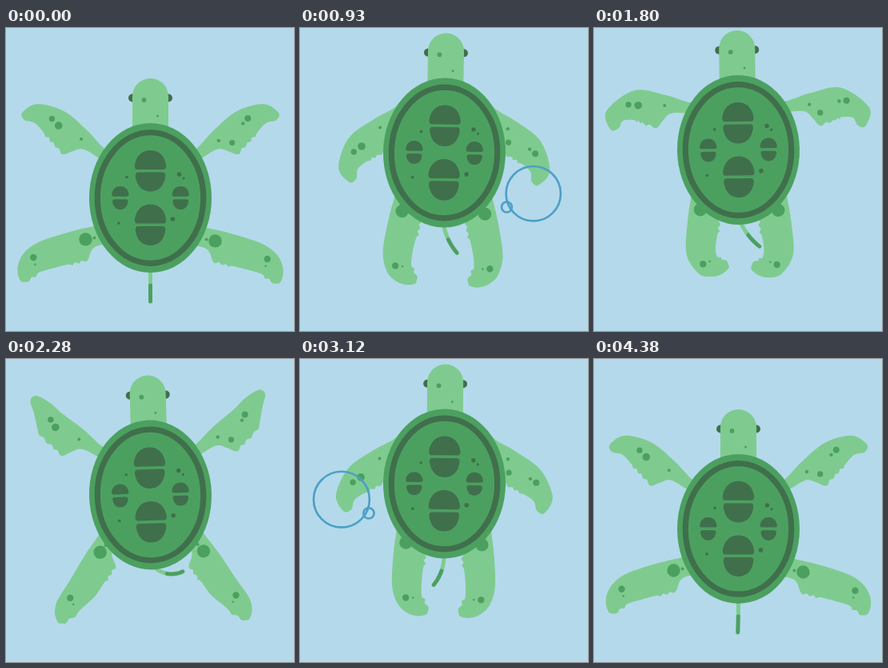
Animation, 360 px wide and 379 px high, one loop 4410 ms. Source, as an HTML page with a canvas:

```html
<!DOCTYPE html>
<html lang="en">
<head>
<meta charset="utf-8">
<title>Swimming turtle</title>
<style>
  html, body { margin: 0; width: 100%; height: 100%; overflow: hidden; background: #b4d9eb; }
  canvas { display: block; width: 360px; height: 379px; }
</style>
</head>
<body>
<canvas id="stage"></canvas>
<script>
const LOOP = 4410, STEP = 30, LIFE = 1090;
const WATER = '#b4d9eb', SKIN = '#7fcb8f', SHELL = '#4ca05f', DARK = '#406f4c', BUBBLE = '#4b9fc6';
const TAU = Math.PI * 2, RAD = Math.PI / 180;
const CX = 180.5, CY = 212.5;

const canvas = document.getElementById('stage');
const ctx = canvas.getContext('2d');
const ratio = window.devicePixelRatio || 1;
canvas.width = 360 * ratio;
canvas.height = 379 * ratio;

// Key poses; body is rise and tilt, the rest are angle and bend in degrees.
const sweep = { arm: [22, 15], leg: [65, -5] };
const poses = [
  { t: 0, body: [0, 0], arm: [-31, 23], leg: [20, 0], tail: [0, 0] },
  { t: 540, body: [-47, .6], ...sweep, tail: [4, 20] },
  { t: 930, body: [-56.5, .9], arm: [46, 48], leg: [83, 14], tail: [9, 34] },
  { t: 1520, body: [-62, 0], arm: [46, 46], leg: [86, 30], tail: [18, 32] },
  { t: 1800, body: [-60, -.8], arm: [-2, 76], leg: [88, 42], tail: [22, 30] },
  { t: 2280, body: [-42.5, -1.5], arm: [-28, -52], leg: [61, -42], tail: [38, 80] },
  { t: 2700, body: [-58, -.2], ...sweep, tail: [20, 20] },
  { t: 3120, body: [-56.5, .5], arm: [45, 36], leg: [90, 10], tail: [4, -45] },
  { t: 3810, body: [-19.5, .4], arm: [45, 36], leg: [80, 3], tail: [8, -90] }
];

// Small bumps along a line, for toes and ragged flipper edges.
function scallop([s0, v0], [s1, v1], count) {
  return Array.from({ length: 2 * count + 1 }, (_, i) => {
    const u = i / (2 * count);
    return [s0 + (s1 - s0) * u, v0 + (v1 - v0) * u + (i % 2 ? 2.5 : 0)];
  });
}

// Outlines run along (s) and across (v) a spine that bends over one stretch.
const arm = {
  part: 'arm', x: 56.5, y: 157, from: 63, to: 112,
  edge: [[-15, -4], [6, -5], [34, -13], [70, -19], [100, -16], [116, -2], [112, 7],
    [98, 8], ...scallop([82, 16], [43, 27], 4), [36, 18], [24, 9], [-15, 9]]
};
const leg = {
  part: 'leg', x: 48.5, y: 251.5, from: 80, to: 115,
  edge: [[0, -8], [21, -11], [50, -14.5], [88, -16], [110, -11], [123, -1], [129, 11], [129, 22],
    ...scallop([125, 25], [104, 20], 2), [85, 21], ...scallop([66, 23], [40, 25], 3), [28, 14], [0, 14]]
};
const legDots = [[35, 1, 8.2], [24, 3, 2], [104, 0, 4.2], [105, 9, 1.3]];
const limbs = [
  { ...leg, side: -1, dots: legDots },
  { ...leg, side: 1, y: 253.5, dots: legDots },
  { ...arm, side: -1, dots: [[35, 0, 2], [68, 0, 4.8], [79, -4, 3.7]] },
  { ...arm, side: 1, dots: [[33, 1, 2.2], [46, 12, 3.6], [70, -2, 2.2], [78, -5, 4]] }
];
const bubbles = [
  { start: 590, x: 307, y: 132, dx: -49, dy: 241, side: -1 },
  { start: 2750, x: 33.6, y: 119, dx: 54, dy: 167, side: 1 }
];

// Periodic monotone cubic interpolation of one part's two values.
function sample(part, t) {
  const n = poses.length;
  const pose = i => poses[(i + n) % n];
  const time = i => pose(i).t + Math.floor(i / n) * LOOP;
  let i = n - 1;
  while (poses[i].t > t) i--;
  const span = time(i + 1) - time(i), u = (t - time(i)) / span;
  return [0, 1].map(c => {
    const val = j => pose(j)[part][c];
    const rate = j => (val(j + 1) - val(j)) / (time(j + 1) - time(j));
    const slope = j => {
      const a = rate(j - 1), b = rate(j);
      return a * b > 0 ? 2 * a * b / (a + b) : 0;
    };
    const p = val(i), d = val(i + 1) - p, m0 = slope(i) * span, m1 = slope(i + 1) * span;
    return p + u * (m0 + u * (3 * d - 2 * m0 - m1 + u * (m0 + m1 - 2 * d)));
  });
}

// Maps (s, v) to x, y on the bent spine.
function bender(angle, bend, from, to) {
  return ([s, v]) => {
    const u = Math.min(Math.max(s - from, 0), to - from);
    const half = bend * u / (to - from) / 2;
    const chord = half ? u * Math.sin(half) / half : u;
    const end = angle + 2 * half;
    const parts = [[Math.min(s, from), angle], [chord, angle + half],
      [Math.max(s - to, 0), end], [v, end + Math.PI / 2]];
    return parts.reduce(([x, y], [r, a]) => [x + r * Math.cos(a), y + r * Math.sin(a)], [0, 0]);
  };
}

function disc(x, y, r, color) {
  ctx.fillStyle = color;
  ctx.beginPath();
  ctx.arc(x, y, r, 0, TAU);
  ctx.fill();
}

function ring(x, y, r, width) {
  if (width <= 0) return;
  ctx.strokeStyle = BUBBLE;
  ctx.lineWidth = width;
  ctx.beginPath();
  ctx.arc(x, y, r, 0, TAU);
  ctx.stroke();
}

// Closed Catmull-Rom curve through the points.
function smoothFill(pts, color) {
  const n = pts.length, at = i => pts[(i + n) % n];
  ctx.fillStyle = color;
  ctx.beginPath();
  ctx.moveTo(...pts[0]);
  for (let i = 0; i < n; i++) {
    const [a, b, c, d] = [at(i - 1), at(i), at(i + 1), at(i + 2)];
    ctx.bezierCurveTo(b[0] + (c[0] - a[0]) / 6, b[1] + (c[1] - a[1]) / 6,
      c[0] - (d[0] - b[0]) / 6, c[1] - (d[1] - b[1]) / 6, c[0], c[1]);
  }
  ctx.fill();
}

function drawLimb({ part, x, y, side, from, to, edge, dots }, t) {
  const [angle, bend] = sample(part, t);
  const place = bender(angle * RAD, bend * RAD, from, to);
  ctx.save();
  ctx.translate(CX + side * x, y);
  ctx.scale(side, 1);
  smoothFill(edge.map(place), SKIN);
  for (const [s, v, r] of dots) disc(...place([s, v]), r, SHELL);
  ctx.restore();
}

function drawTail(t) {
  const [angle, curl] = sample('tail', t);
  const place = bender((90 - angle) * RAD, -curl * RAD, 0, 44);
  const stroke = (a, b, color, cap) => {
    ctx.strokeStyle = color;
    ctx.lineWidth = 5;
    ctx.lineCap = cap;
    ctx.beginPath();
    for (let s = a; s <= b; s += 2) ctx.lineTo(...place([s, 0]));
    ctx.stroke();
  };
  ctx.save();
  ctx.translate(CX, 300);
  stroke(0, 22, SKIN, 'butt');
  stroke(22, 42, SHELL, 'round');
  ctx.restore();
}

function drawHead() {
  for (const side of [-1, 1]) disc(CX + side * 22.5, 87.5, 5, DARK);
  ctx.fillStyle = SKIN;
  ctx.beginPath();
  ctx.arc(CX, 85.5, 22.5, Math.PI, 0);
  ctx.lineTo(CX + 22.5, 135);
  ctx.lineTo(CX - 22.5, 135);
  ctx.fill();
  disc(172.5, 90, 2.9, SHELL);
  disc(189.5, 110, 1.5, SHELL);
}

function dome(x, y, w, h) {
  const k = h / 24;
  ctx.save();
  ctx.translate(x, y);
  ctx.fillStyle = DARK;
  ctx.beginPath();
  ctx.moveTo(3 - w, 0);
  ctx.lineTo(w - 3, 0);
  ctx.quadraticCurveTo(w, 0, w, -5 * k);
  ctx.bezierCurveTo(w * .9, -h * .75, w * .5, -h, 0, -h);
  ctx.bezierCurveTo(-w * .5, -h, -w * .9, -h * .75, -w, -5 * k);
  ctx.quadraticCurveTo(-w, 0, 3 - w, 0);
  ctx.fill();
  ctx.restore();
}

function domePair(x, y, w, h) {
  dome(x, y - 1.8, w, h);
  dome(x, y + 1.8, w - .9, -h);
}

function drawShell() {
  ctx.fillStyle = SHELL;
  ctx.beginPath();
  ctx.ellipse(CX, CY, 76.5, 93.5, 0, 0, TAU);
  ctx.fill();
  ctx.strokeStyle = DARK;
  ctx.lineWidth = 7.2;
  ctx.beginPath();
  ctx.ellipse(CX, CY, 66.2, 81.8, 0, 0, TAU);
  ctx.stroke();
  for (const side of [-1, 1]) {
    domePair(CX, CY + side * 33.8, 19.7, 24);
    domePair(CX + side * 37.7, CY, 10.7, 12.7);
  }
  const spots = [[216.5, 183, 2.7], [222, 188, 1.6], [151, 186.5, 1.8], [141, 244, 1.8], [208.5, 239, 2.8]];
  for (const [x, y, r] of spots) disc(x, y, r, DARK);
}

function drawBubble({ start, x, y, dx, dy, side }, t) {
  const p = (t - start) / LIFE;
  if (p <= 0 || p >= 1) return;
  const grow = 1 - Math.exp(-7 * p);
  const bx = x + dx * p, by = y + dy * p;
  ring(bx, by, 38.5 * grow, 2.6 * Math.min(1, (1 - p) * 4));
  ring(bx + side * 37.5 * grow, by + 19 * grow, 7.3 * grow, 2.6 * Math.min(1, (.75 - p) * 4));
}

function draw(t) {
  ctx.setTransform(ratio, 0, 0, ratio, 0, 0);
  ctx.fillStyle = WATER;
  ctx.fillRect(0, 0, 360, 379);
  const [rise, tilt] = sample('body', t);
  ctx.save();
  ctx.translate(CX, CY + rise);
  ctx.rotate(tilt * RAD);
  ctx.translate(-CX, -CY);
  drawTail(t);
  for (const limb of limbs) drawLimb(limb, t);
  drawHead();
  drawShell();
  ctx.restore();
  for (const b of bubbles) drawBubble(b, t);
}

const begin = performance.now();
function frame() {
  const t = (performance.now() - begin) % LOOP;
  draw(Math.floor(t / STEP) * STEP);
  requestAnimationFrame(frame);
}
frame();
</script>
</body>
</html>
```
